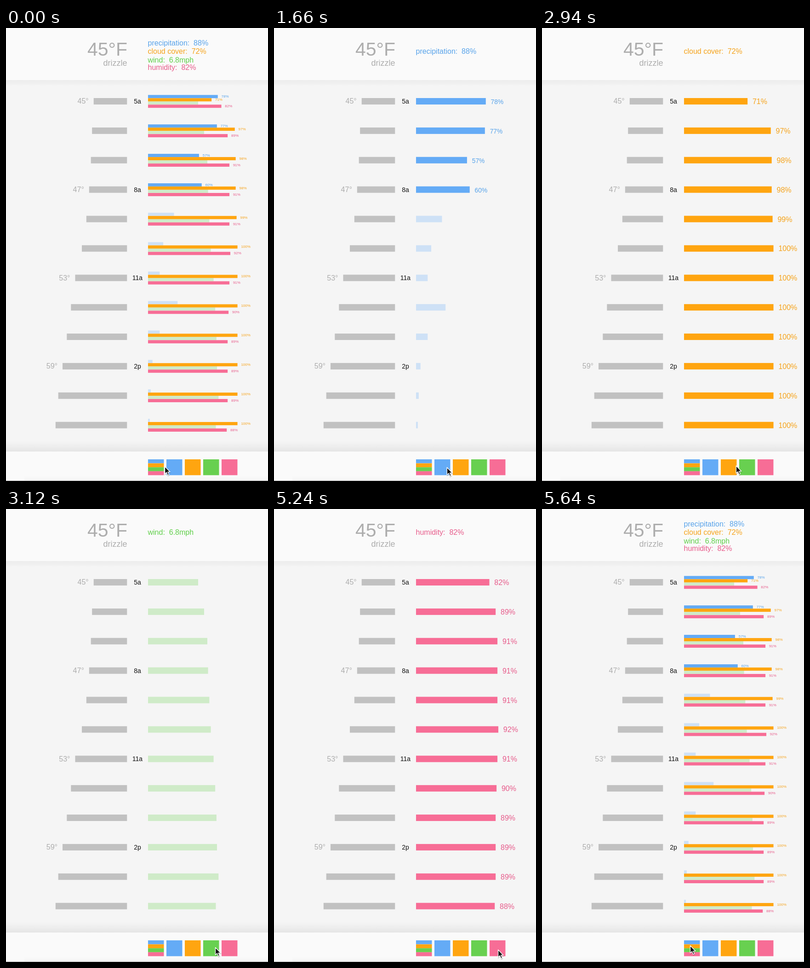
Write an HTML page that moves like this. It is 570 px wide and 983 px high and loops after 6.64 s.

```html
<!DOCTYPE html>
<html lang="en">
<head>
<meta charset="utf-8">
<title>Hourly forecast</title>
<style>
html, body { margin: 0; width: 100%; height: 100%; overflow: hidden; background: #f5f5f5; }
svg { display: block; width: 100%; height: 100%; }
text { font-family: "Liberation Sans", Arial, Helvetica, sans-serif; white-space: pre; }
</style>
</head>
<body>
<svg id="stage" viewBox="0 0 570 983">
  <defs>
    <linearGradient id="top" x2="0" y2="1">
      <stop offset="0" stop-color="#ededed"/><stop offset=".65" stop-color="#f0f0f0"/><stop offset="1" stop-color="#f5f5f5"/>
    </linearGradient>
    <linearGradient id="low" x2="0" y2="1">
      <stop offset="0" stop-color="#f5f5f5"/><stop offset=".5" stop-color="#eeeeee"/><stop offset="1" stop-color="#e5e5e5"/>
    </linearGradient>
    <linearGradient id="foot" x2="0" y2="1">
      <stop offset="0" stop-color="#fafafa"/><stop offset="1" stop-color="#f4f4f4"/>
    </linearGradient>
  </defs>
</svg>
<script>
const LOOP = 6640, STEP = 20;
const LEFT = 309, FULL = 194.6, TEMP_END = 263.3;
const stage = document.getElementById("stage");

const series = [
  { label: "precipitation:  88%", bar: "#64abf6", ink: "#58a3ea", size: 13.8, headY: 38,
    values: [78, 77, 57, 60, 29, 17, 13, 33, 13, 5, 3, 2], solid: v => v >= 50 },
  { label: "cloud cover:  72%", bar: "#ffa510", ink: "#f5a31c", size: 16, headY: 56,
    values: [71, 97, 98, 98, 99, 100, 100, 100, 100, 100, 100, 100], solid: () => true },
  { label: "wind:  6.8mph", bar: "#68d050", ink: "#60cf4a", size: 16, headY: 74.5,
    values: [56, 62.7, 66.3, 67.1, 68.5, 70.2, 73.3, 75.1, 76.5, 77.1, 78.8, 75.8], solid: () => false },
  { label: "humidity:  82%", bar: "#f76d96", ink: "#e75c8b", size: 16, headY: 90.5,
    values: [82, 89, 91, 91, 91, 92, 91, 90, 89, 89, 89, 88], solid: () => true }
];
const tempBars = [190.7, 187.2, 184.7, 180.8, 174.8, 165, 150.5, 141.3, 132.3, 123, 113.7, 107.8];
const temps = ["45°", "47°", "53°", "59°"];
const hours = ["5a", "8a", "11a", "2p"];
const rowY = i => 159 + 63.88 * i;

function add(parent, tag, attrs, text) {
  const el = document.createElementNS("http://www.w3.org/2000/svg", tag);
  for (const key in attrs) el.setAttribute(key, attrs[key]);
  if (text) el.textContent = text;
  parent.appendChild(el);
  return el;
}
const rect = (parent, x, y, width, height, fill, opacity = 1) =>
  add(parent, "rect", { x, y, width, height, fill, "fill-opacity": opacity });
const write = (parent, text, x, y, size, fill, anchor = "start") =>
  add(parent, "text", { x, y, "font-size": size, fill, "text-anchor": anchor }, text);

function drawSeries(parent, s, slot) {
  const stacked = slot >= 0;
  const height = stacked ? 6.95 : 14;
  write(parent, s.label, LEFT - 0.5, stacked ? s.headY : 56, 16, s.ink);
  s.values.forEach((v, i) => {
    const y = rowY(i) + (stacked ? 7 * slot - 13.7 : -7);
    const width = FULL * v / 100;
    const solid = s.solid(v);
    rect(parent, LEFT, y, width, height, s.bar, solid ? 1 : 0.27);
    if (!solid) return;
    const x = LEFT + width + (stacked ? 7.8 : 10.8);
    write(parent, v + "%", x, y + (stacked ? 5.7 : 13), stacked ? 8 : s.size, s.ink);
  });
}

function drawFrame() {
  rect(stage, 0, 0, 570, 983, "#f5f5f5");
  rect(stage, 0, 113, 570, 12, "url(#top)");
  rect(stage, 0, 0, 570, 113, "#fafafa");
  rect(stage, 0, 896, 570, 23, "url(#low)");
  rect(stage, 0, 919, 570, 64, "#fafafa");
  rect(stage, 40, 972, 530, 10, "url(#foot)");
  rect(stage, 0, 982, 570, 1, "#a5a5a5");
  write(stage, "45°F", 264, 60, 41, "#adadad", "end");
  write(stage, "drizzle", 263.5, 82, 18, "#adadad", "end");
  tempBars.forEach((x, i) => {
    const y = rowY(i);
    rect(stage, x, y - 7, TEMP_END - x, 14, "#c1c1c1");
    if (i % 3) return;
    write(stage, temps[i / 3], x - 11, y + 5.3, 16, "#adadad", "end");
    write(stage, hours[i / 3], 286, y + 5, 14, "#111", "middle");
  });
}

function drawSwatches() {
  series.forEach((s, i) => {
    rect(stage, LEFT, 936 + 8.6 * i, 34.5, 8.6, s.bar);
    rect(stage, LEFT + 40 * (i + 1), 936, 34.5, 34.4, s.bar);
  });
}

drawFrame();
drawSwatches();

// Views 0-3 show one series each; view 4 stacks them all.
const views = [0, 1, 2, 3, 4].map(n => {
  const g = add(stage, "g", {});
  if (n < 4) drawSeries(g, series[n], -1);
  else series.forEach((s, i) => drawSeries(g, s, i));
  return g;
});

const cursor = add(stage, "g", {});
const arrow = "M0 0V16.2L3.7 12.8L6.4 19L9.1 17.8L6.5 11.8H11.4Z";
add(cursor, "path", { d: arrow, transform: "translate(.5 1.5)", fill: "#000", opacity: 0.2, stroke: "#000", "stroke-width": 1.5 });
add(cursor, "path", { d: arrow, fill: "#111", stroke: "#fff", "stroke-width": 1.3, "stroke-linejoin": "round" });

const linear = p => p;
const smooth = p => p * p * (3 - 2 * p);
const home = { x: 345.5, y: 951.5 };
const moves = [
  { start: 500, end: 620, x: 367.5, y: 954.5, view: 0, ease: linear },
  { start: 1620, end: 1900, x: 411.3, y: 949.5, view: 1, ease: linear },
  { start: 2900, end: 3120, x: 455.5, y: 951.5, view: 2, ease: linear },
  { start: 4120, end: 4240, x: 488.7, y: 956.5, view: 3, ease: linear },
  { start: 5240, end: 5640, x: 322.5, y: 947.5, view: 4, ease: smooth }
];

function stateAt(t) {
  let { x, y } = home, view = 4;
  for (const m of moves) {
    if (t < m.start) break;
    const total = (m.end - m.start) / STEP + 1;
    const done = Math.floor((t - m.start) / STEP) + 1;
    const p = m.ease(Math.min(1, done / total));
    x += (m.x - x) * p;
    y += (m.y - y) * p;
    if (t >= m.end - 2 * STEP) view = m.view;
  }
  return { x, y, view };
}

function render(t) {
  const { x, y, view } = stateAt(t);
  views.forEach((g, i) => g.setAttribute("display", i === view ? "inline" : "none"));
  cursor.setAttribute("transform", `translate(${x} ${y})`);
}

const begin = performance.now();
function tick() {
  render((performance.now() - begin) % LOOP);
  requestAnimationFrame(tick);
}
tick();
</script>
</body>
</html>
```
